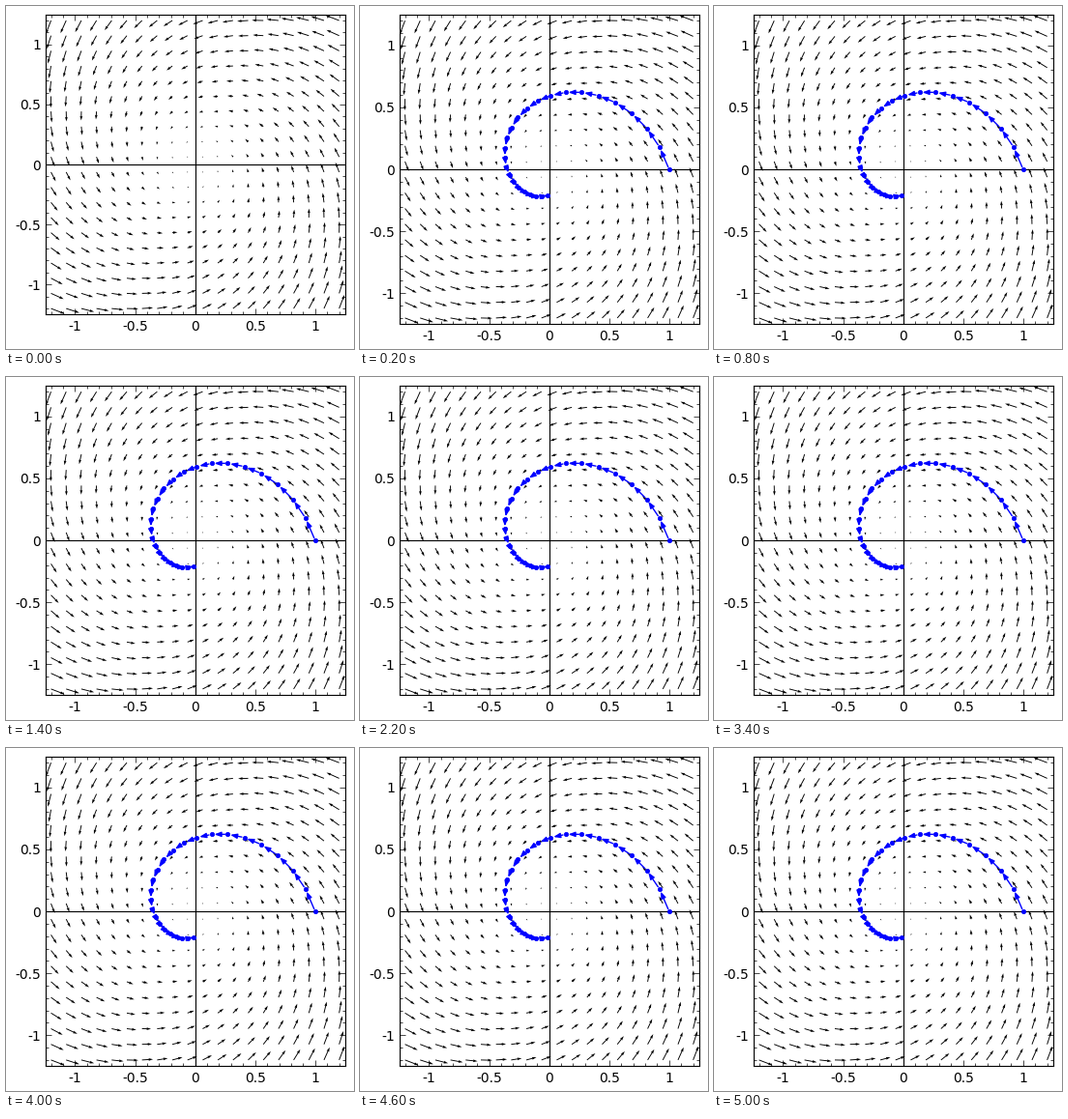
A matplotlib script for the animation above (5200 ms loop, 360 by 355 pixels).

```python
import numpy as np
import matplotlib.pyplot as plt
from matplotlib.animation import FuncAnimation
from matplotlib.patches import FancyArrowPatch
from matplotlib.ticker import MultipleLocator

W, H, DPI = 360, 355, 100
FRAMES, INTERVAL = 26, 200
LEFT, TOP, WIDTH = 40.6, 9.05, 310
DECAY, SPIN, STEP = 0.4, 0.9, 0.2
REACH, LIMIT = 1.2, 1.248

plt.rcParams["font.family"] = "DejaVu Sans"
plt.rcParams["font.size"] = 10


def velocity(x, y):
    return -DECAY * x - SPIN * y, SPIN * x - DECAY * y


def euler_path(x, y, steps):
    pts = [(x, y)]
    for _ in range(steps):
        u, v = velocity(x, y)
        x, y = x + STEP * u, y + STEP * v
        pts.append((x, y))
    return pts


def field_axes(fig, height):
    """Framed plot of the vector field, `height` pixels tall."""
    ax = fig.add_axes([LEFT / W, 1 - (TOP + height) / H, WIDTH / W, height / H])
    ax.set_xlim(-LIMIT, LIMIT)
    ax.set_ylim(-LIMIT, LIMIT)

    ticks = [-1, -0.5, 0, 0.5, 1]
    labels = [f"{t:g}" for t in ticks]
    ax.set_xticks(ticks, labels)
    ax.set_yticks(ticks, labels)
    for axis in (ax.xaxis, ax.yaxis):
        axis.set_minor_locator(MultipleLocator(0.1))
    ax.tick_params(which="both", direction="in", top=True, right=True, width=0.5)
    ax.tick_params(which="major", length=4)
    ax.tick_params(which="minor", length=2)
    ax.tick_params(axis="x", pad=4.33)
    ax.tick_params(axis="y", pad=3.35)
    for spine in ax.spines.values():
        spine.set_linewidth(0.8)

    side = np.linspace(-REACH, REACH, 20)
    x, y = np.meshgrid(side, side)
    ax.quiver(x, y, *velocity(x, y), color="black")
    ax.axhline(0, color="black", lw=0.8)
    ax.axvline(0, color="black", lw=0.8)
    return ax


def draw_path(ax, pts):
    for a, b in zip(pts, pts[1:]):
        ax.add_patch(FancyArrowPatch(
            a, b, arrowstyle="-|>,head_length=4,head_width=1.5",
            mutation_scale=1, lw=1, color="blue", zorder=3))
    ax.scatter(*zip(*pts), s=10, color="blue", linewidths=0.5, zorder=5)


fig = plt.figure(figsize=(W / DPI, H / DPI), dpi=DPI, facecolor="white")
bare = field_axes(fig, 310)
traced = field_axes(fig, 320)
draw_path(traced, euler_path(1.0, 0.0, 24))


def update(i):
    bare.set_visible(i == 0)
    traced.set_visible(i > 0)
    return bare, traced


anim = FuncAnimation(fig, update, frames=FRAMES, interval=INTERVAL,
                     init_func=lambda: update(0), repeat=True,
                     repeat_delay=0, blit=False)
plt.show()
```
